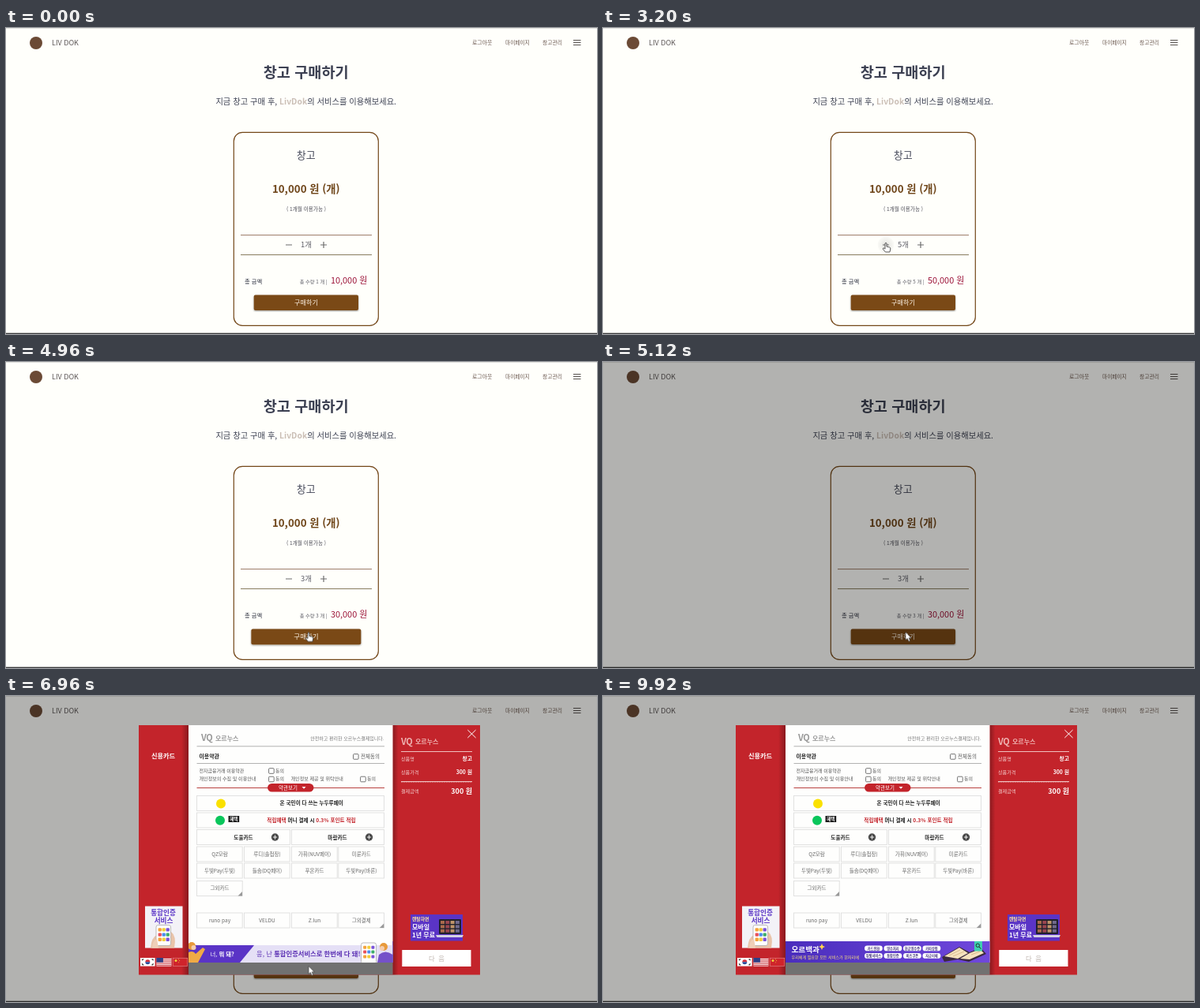
An HTML page that plays this animation: 748 by 388 pixels, repeating every 10 s.

```html
<!DOCTYPE html>
<html lang="ko">
<head>
<meta charset="utf-8">
<title>창고 구매하기</title>
<style>
html, body { margin: 0; width: 100%; height: 100%; overflow: hidden; background: #fffffb; }
svg { display: block; width: 748px; height: 388px; font-family: "Noto Sans CJK KR", "Noto Sans CJK", sans-serif; }
text { white-space: pre; }
.anim { animation: 10s step-end infinite; }
#overlay { animation-name: overlay; }
#modal { animation-name: modal; }
.late { animation-name: late; }
#ring { animation-name: ring; }
#buy { animation-name: hover; transform-origin: 380px 348px; }
#plusGlow { animation-name: plusGlow; animation-timing-function: ease-out; }
#minusGlow { animation-name: minusGlow; animation-timing-function: ease-out; }
#hand { animation-name: hand; }
#arrow { animation-name: arrow; }
#slides { animation: slide 10s ease-in-out infinite; }
#cursor { animation: move 10s ease-in-out infinite; }
@keyframes overlay { 0% { opacity: 0 } 50.9% { opacity: 1 } }
@keyframes modal { 0% { opacity: 0 } 58.9% { opacity: 1 } }
@keyframes late { 0% { opacity: 0 } 63% { opacity: 1 } }
@keyframes ring { 0%, 98.9% { opacity: 0 } 71.6% { opacity: 1 } }
@keyframes hover { 0%, 50.9% { transform: none } 40.9% { transform: scale(1.05, 1.02) } }
@keyframes plusGlow { 0%, 9.2%, 26.5%, 100% { opacity: 0 } 10%, 15% { opacity: .35 } 16.5%, 22% { opacity: 1 } 24.5% { opacity: .35 } }
@keyframes minusGlow { 0%, 29%, 39.4%, 100% { opacity: 0 } 29.8%, 32% { opacity: .35 } 33%, 36.5% { opacity: 1 } 38.4% { opacity: .35 } }
@keyframes hand { 0%, 26.2%, 39.4%, 50.9% { opacity: 0 } 9.2%, 29%, 40.9% { opacity: 1 } }
@keyframes arrow { 0%, 9.2%, 29%, 40.9%, 76.9% { opacity: 0 } 3.9%, 26.2%, 39.4%, 50.9% { opacity: 1 } }
@keyframes slide { 0%, 87.6% { transform: none } 92%, 100% { transform: translateX(-258.5px) } }
@keyframes move {
  0%, 4% { transform: translate(480px, 30px) }
  5.6%, 6.8% { transform: translate(434px, 93px) }
  9.6%, 25.6% { transform: translate(401.5px, 272px) }
  29.6%, 38.4% { transform: translate(358px, 272px) }
  41.6%, 69.6% { transform: translate(383px, 342.5px) }
  73.6%, 74.8% { transform: translate(419px, 200px) }
  76.8%, 100% { transform: translate(520px, 0) }
}
</style>
</head>
<body>
<script>
const RED = '#c3242b', PURPLE = '#5a34c6', BROWN = '#734718';

const text = (x, y, size, s, fill = '#555', anchor = 'start', weight = 400, extra = '') =>
  `<text x="${x}" y="${y}" font-size="${size}" fill="${fill}" text-anchor="${anchor}" font-weight="${weight}" ${extra}>${s}</text>`;
const mid = (x, y, size, s, fill, weight, extra) => text(x, y, size, s, fill, 'middle', weight, extra);
const end = (x, y, size, s, fill, weight, extra) => text(x, y, size, s, fill, 'end', weight, extra);
const rect = (x, y, w, h, fill, extra = '') => `<rect x="${x}" y="${y}" width="${w}" height="${h}" fill="${fill}" ${extra}/>`;
const circle = (x, y, r, fill, extra = '') => `<circle cx="${x}" cy="${y}" r="${r}" fill="${fill}" ${extra}/>`;
const path = (d, fill, stroke = 'none', width = 1, extra = '') =>
  `<path d="${d}" fill="${fill}" stroke="${stroke}" stroke-width="${width}" ${extra}/>`;
const line = (d, stroke, width, extra) => path(d, 'none', stroke, width, extra);
const late = s => `<g class="anim late">${s}</g>`;
const cell = (x, y, w, h = 19) => rect(x, y, w, h, 'none', 'stroke="#dedede" stroke-width=".9"');
const check = (x, y) => rect(x, y, 6.6, 6.6, '#fff', 'rx="1" stroke="#666" stroke-width=".9"');
const corner = (x, y) => path(`M${x} ${y}v-5.5l-5.5 5.5z`, '#999');

// Coloured app tiles on a small phone
const phone = (x, y, w, h, tile) => {
  const colors = ['#f5a33b', '#3fae6a', '#4c8df0', '#e8505b', '#7a54d8', '#f1cf3d'];
  let s = rect(x, y, w, h, '#fff', 'rx="2.5" stroke="#aaa" stroke-width=".8"');
  for (let i = 0; i < 9; i++)
    s += rect(x + w * (.14 + i % 3 * .27), y + h * .14 + (i / 3 | 0) * tile * 1.45, tile, tile, colors[i * 5 % 6 + 0], 'rx="1"');
  return s;
};

const header = () =>
  rect(0, 0, 748, .8, '#deded9') + circle(38, 19, 8, '#6b4a35') +
  text(58, 22, 9, 'LIV DOK', '#5c5657', 'start', 300) +
  text(590, 20.6, 6.9, '로그아웃', '#6b5850') +
  text(632, 20.6, 6.7, '마이페이지', '#6b5850') +
  text(679, 20.6, 6.8, '창고관리', '#6b5850') +
  line('M718 15.5h9.5M718 18.5h9.5M718 21.5h9.5', '#57524f', 1.1);

const card = () =>
  rect(288.3, 132.4, 183, 245, 'none', `rx="11" stroke="${BROWN}" stroke-width="1.2"`) +
  mid(379.7, 166, 13, '창고', '#454859') +
  mid(379.7, 209.3, 13.3, '10,000 원 (개)', '#6f461a', 600) +
  mid(380, 231.8, 6.6, '( 1개월 이용가능 )', '#4a4a55') +
  line('M297 262.6h166', '#9b7a66', 1) + line('M297 287.6h166', '#85795a', 1) +
  circle(402, 275, 10.5, 'url(#glow)', 'id="plusGlow" class="anim"') +
  circle(358, 275, 10.5, 'url(#glow)', 'id="minusGlow" class="anim"') +
  line('M354 275h8M398 275h8M402 271v8', '#6d6d6d', 1.2) +
  mid(380, 278.4, 9.4, '', '#5a5a64', 400, 'id="count"') +
  text(302, 323.7, 7.3, '총 금액', '#262a3a', 'start', 500) +
  end(406.5, 324, 6.2, '', '#5a5a64', 400, 'id="amount"') +
  end(457.3, 324.2, 10.9, '', '#9c1338', 400, 'id="price"') +
  `<g id="buy" class="anim">` +
  rect(313.7, 338.6, 132.3, 19.4, '#7a4817', 'rx="2" filter="url(#drop)"') +
  mid(380, 351.2, 8.1, '구매하기', '#fff6ea') + '</g>';

const page = () =>
  rect(0, 0, 748, 388, '#fffffb') + header() +
  mid(379.7, 62.6, 18.6, '창고 구매하기', '#3c4052', 600) +
  mid(379.7, 96.6, 10.3, '지금 창고 구매 후, <tspan fill="#cbbfb6" font-weight="700">LivDok</tspan>의 서비스를 이용해보세요.', '#3c4052') +
  card() + rect(0, 386.7, 748, 1.3, '#3a3a3c');

const brand = (x, y, fill) =>
  text(x, y, 11, 'VQ', fill, 'start', 800, 'letter-spacing="-.4"') + text(x + 18, y - .5, 8, '오르누스', fill, 'start', 700);

const flags = () => {
  let s = rect(170, 332, 18.6, 10.6, '#fff') +
    path('M176.3 337.3a3 3 0 0 1 6 0z', '#d2303b') + path('M176.3 337.3a3 3 0 0 0 6 0z', '#2a4b9b') +
    line('M172 335l2-1.6M172 339.6l2 1.6M184.6 333.4l2 1.6M184.6 341.2l2-1.6', '#333', 1.3) +
    rect(190.4, 332, 19, 10.6, '#fff');
  for (let i = 0; i < 5; i++) s += rect(190.4, 332 + i * 2.2, 19, 1.1, '#c94048');
  return s + rect(190.4, 332, 8.5, 5.7, '#2c3f86') +
    rect(211.2, 332.2, 18.6, 10.2, '#cf242b', 'stroke="#e9a0a0" stroke-width=".5"') +
    circle(215, 335.5, 1.5, '#f1cf3d') + [[218.5, 333.8], [219.6, 335.6], [218.6, 337.8]].map(p => circle(...p, .5, '#f1cf3d')).join('');
};

const leftPanel = () =>
  rect(176, 266.5, 47.5, 53, '#f3f2f7') +
  mid(199, 277.8, 8.6, '통합인증', PURPLE, 700) + mid(199.5, 287.6, 8.6, '서비스', PURPLE, 700) +
  path('M183 319.5Q184 306 191 303L209 299Q216 304 213 319.5z', '#e9c4aa') +
  phone(190, 290.5, 18.5, 26, 4.3) + path('M185 319.5q0-9 6-12l2 12z', '#efcfb8') +
  flags() + late(mid(199, 79.3, 8.2, '신용카드', '#fff', 600));

const laptop = () => {
  let s = rect(548, 283, 28, 19, '#20202c', 'rx="1"') + path('M544 303h35l-1.5 3h-32z', '#d4d1e2');
  for (let i = 0; i < 12; i++)
    s += rect(550 + i % 4 * 6.3, 285 + (i / 4 | 0) * 5.4, 5, 4, ['#a86a4c', '#716a8c', '#bd9368', '#9a4650'][i * 3 % 4]);
  return s;
};

const rightPanel = () =>
  brand(500, 61.8, '#eeb4b2') + line('M584.3 43l10.3 10M594.6 43l-10.3 10', '#fff', 1) +
  line('M500 70.5h90', '#f0c0be', 1) + line('M500 109h90', '#d98a88', .8, 'stroke-dasharray="2 1"') +
  rect(512, 277, 66, 33.5, PURPLE) +
  text(514, 285, 5.8, '렌탈하면', '#ffe9a0', 'start', 600) +
  text(514, 295.5, 8, '모바일', '#fff', 'start', 700) + text(514, 305.8, 8, '1년 무료', '#fff', 'start', 700) +
  laptop() + rect(501.3, 322, 87.2, 21, '#fff') +
  late(
    text(500, 82, 6.1, '상품명', '#f3cfce') + end(590, 82.3, 6.8, '창고', '#fff', 700) +
    text(500, 98.8, 6.1, '상품가격', '#f3cfce') + end(590, 99, 6.8, '300 원', '#fff', 700) +
    line('M500 108.6h90', '#f4d4d3', 1) +
    text(500, 123.4, 6.1, '결제금액', '#f3cfce') + end(590, 124.3, 9, '300 원', '#fff', 600) +
    mid(545, 335.6, 8.4, '다  음', '#c0b7b2'));

const bannerOne = () =>
  rect(231, 316, 258.5, 22, '#e5e0f6') + path('M231 316h83l-18 22h-65z', PURPLE) +
  circle(235, 317, 5, '#e89a3c') + circle(237.5, 319, 3, '#f5cdae') +
  path('M231 338v-13q6-3 9 2l9-8 3 2-9 17z', '#f0aa45') +
  text(258.5, 329.8, 7.4, '너, <tspan font-weight="700">뭐 돼?</tspan>', '#fff') +
  text(317, 329.8, 8.3, '응, 난 <tspan font-weight="700">통합인증서비스로 한번에 다 돼!</tspan>', '#5b30b4') +
  phone(449.5, 313, 19, 27, 4) +
  circle(478, 318, 5, '#e89a3c') + circle(476, 320, 3, '#f5cdae') +
  path('M470 338l2-10q8-7 17.5 0v10z', '#7551c9');

const bannerTwo = () => {
  const tags = ['카드전환', '영수처리', '현금영수증', '카피상점', '위젯서비스', '통합인증', '비즈쿠폰', '자금이체'];
  return '<g transform="translate(258.5)">' + rect(231, 311, 258.5, 27, 'url(#violet)') +
    text(238.5, 325.3, 9.6, '오르백과', '#fff', 'start', 700) +
    path('M277 314l1.2 2.8 2.8 1.2-2.8 1.2-1.2 2.8-1.2-2.8-2.8-1.2 2.8-1.2z', '#ffd44c') +
    text(238.5, 332.8, 5.1, '우리에게 필요한 모든 서비스가 한자리에', '#ffe47a') +
    tags.map((s, i) => {
      const x = 331 + i % 4 * 24.5, y = 316.5 + (i / 4 | 0) * 9.5;
      return rect(x, y, 22.8, 6.8, '#fff', 'rx="3.4"') + mid(x + 11.4, y + 5, 4.2, s, '#40307c', 600);
    }).join('') +
    path('M429 331l22-13 13 7 14-6 7 8-22 10-14-3-17 3z', '#3b2a3f') +
    path('M432 330l19-11 11 7-13 7zM464 326l13-5 5 5-18 8-12-1z', '#f5e2bd') +
    line('M438 329l14-7M443 330l14-6M466 328l11-4', '#c9a877', .7) +
    rect(470, 311, 10, 12.5, '#3ecfae') + circle(474.3, 316.2, 2.2, 'none', 'stroke="#222" stroke-width=".9"') +
    line('M476 318l2.4 2.6', '#222', 1) + '</g>';
};

const terms = () =>
  line('M241.5 63.8h237.5M241.5 85.5h237.5', '#aaa', .9) +
  check(439.5, 73.6) + check(332.6, 91.7) + check(332.6, 102.2) + check(448.6, 102.2) +
  line('M241.5 116.5h237.5', '#b9413f', 1) + rect(331, 111, 58.5, 10.6, RED, 'rx="5.3"') +
  text(345, 118.8, 6.5, '약관보기', '#fff') + path('M374.5 115h5l-2.5 2.8z', '#fff') +
  late(
    end(478.5, 56, 6, '안전하고 편리한 오르누스결제입니다.', '#777') +
    text(244.5, 79.3, 6.9, '이용약관', '#222', 'start', 600) + text(449, 79.1, 6.5, '전체동의') +
    text(244.5, 96.8, 6, '전자금융거래 이용약관') + text(341, 97, 6, '동의') +
    text(244.5, 106.9, 6.05, '개인정보의 수집 및 이용안내') + text(341, 107, 6, '동의') +
    text(360.5, 106.9, 6.05, '개인정보 제공 및 위탁안내') + text(457, 107, 6, '동의'));

const methods = () => {
  const cols = [241.5, 301.5, 361.5, 420.8];
  const rows = [
    [191, ['QZ모람', '루디(솔첩장)', '가휘(NUV페이)', '미룬카드']],
    [212, ['두빛Pay(두빛)', '들솜(DQ페이)', '푸온카드', '두빛Pay(바론)']],
    [234.5, ['그외카드']],
    [275, ['runo pay', 'VELDU', 'Z.lun', '그외결제']]
  ];
  let boxes = cell(241.5, 126.5, 237) + cell(241.5, 148, 237) + cell(241.5, 169.5, 118) + cell(361.5, 169.5, 117);
  let labels = mid(386.7, 138.4, 6.6, '온 국민이 다 쓰는 누두루페이', '#222', 600) +
    mid(386.5, 159.5, 6.6, `<tspan fill="${RED}">적립혜택</tspan> 머니 결제 시 <tspan fill="${RED}">0.3% 포인트 적립</tspan>`, '#222', 600) +
    mid(300.5, 181.6, 6.6, '도울카드', '#222', 600) + mid(419.5, 181.6, 6.6, '마람카드', '#222', 600);
  for (const [y, names] of rows) names.forEach((s, i) => {
    boxes += cell(cols[i], y, 57.7);
    labels += mid(cols[i] + 29, y + 11.7, 6.5, s, '#666');
  });
  for (const x of [340.5, 459.5])
    boxes += circle(x, 179, 4.7, '#4a4a4a') + line(`M${x - 2.6} 179h5.2M${x} 176.4v5.2`, '#fff', .9);
  return boxes + corner(299, 253.5) + corner(478.3, 294) +
    circle(272, 136.5, 6, '#fae100') + circle(271, 157.7, 6, '#09c65b') +
    rect(281.5, 152, 13.7, 8, '#1c1c1c') + mid(288.3, 158, 5.6, '혜택', '#fff', 600) + late(labels);
};

const modal = () =>
  '<g id="modal" class="anim">' + rect(168, 37, 432, 316.5, RED) +
  rect(222, 37, 9, 316.5, 'url(#shadeL)') + rect(489.5, 37, 7, 316.5, 'url(#shadeR)') +
  rect(231, 37, 258.5, 301, '#fefefd') + rect(231, 338, 258.5, 15.5, '#717171') +
  brand(247, 57.3, '#999') + terms() + methods() + leftPanel() + rightPanel() +
  `<g clip-path="url(#window)"><g id="slides">${bannerOne()}${bannerTwo()}</g></g>` +
  '<g id="ring" class="anim">' + rect(166.6, 36, 435.2, 318.8, 'none', 'rx="2.5" stroke="#f4f4f4" stroke-width="1"') +
  rect(167.6, 37, 433.2, 316.8, 'none', 'rx="2" stroke="#161616" stroke-width="1.3"') + '</g></g>';

const cursor = () => '<g id="cursor">' +
  path('M0 0V10L2.3 8L4 11.8L5.7 11L4.1 7.4H7.2Z', '#fff', '#333', .6, 'id="arrow" class="anim"') +
  path('M-1 1Q0-.4 1 1V5.2L4.6 6Q6 6.4 5.8 8L5 12H-.6L-3.8 8.2Q-3.6 6.6-2.2 7.2L-1 8.2Z', '#fff', '#333', .8, 'id="hand" class="anim"') +
  '</g>';

const fade = (id, from, to) =>
  `<linearGradient id="${id}"><stop stop-opacity="${from}"/><stop offset="1" stop-opacity="${to}"/></linearGradient>`;

document.body.innerHTML = `<svg viewBox="0 0 748 388"><defs>
  <radialGradient id="glow"><stop offset=".2" stop-opacity=".26"/><stop offset="1" stop-opacity=".05"/></radialGradient>
  <linearGradient id="violet"><stop stop-color="#4a2dbd"/><stop offset="1" stop-color="#7048dc"/></linearGradient>
  ${fade('shadeL', 0, .3)}${fade('shadeR', .3, 0)}
  <filter id="drop"><feDropShadow dx="0" dy="1" stdDeviation=".9" flood-opacity=".4"/></filter>
  <clipPath id="window"><rect x="231" y="311" width="258.5" height="27"/></clipPath></defs>
  ${page()}${rect(0, 0, 748, 388, '#000', 'id="overlay" class="anim" fill-opacity=".3"')}${modal()}${cursor()}</svg>`;

// Quantity after each click on plus or minus
const clicks = [[0, 1], [1560, 2], [1720, 3], [1960, 4], [2120, 5], [3240, 4], [3560, 3]];
const byId = id => document.getElementById(id);
let start, shown;

function setCount(n) {
  if (n === shown) return;
  shown = n;
  byId('count').textContent = `${n}개`;
  byId('amount').textContent = `총 수량 ${n} 개 |`;
  byId('price').textContent = `${n}0,000 원`;
}

function tick(now) {
  start ??= now;
  const t = (now - start) % 10000;
  setCount(clicks.filter(c => c[0] <= t).pop()[1]);
  requestAnimationFrame(tick);
}

setCount(1);
requestAnimationFrame(tick);
</script>
</body>
</html>
```
